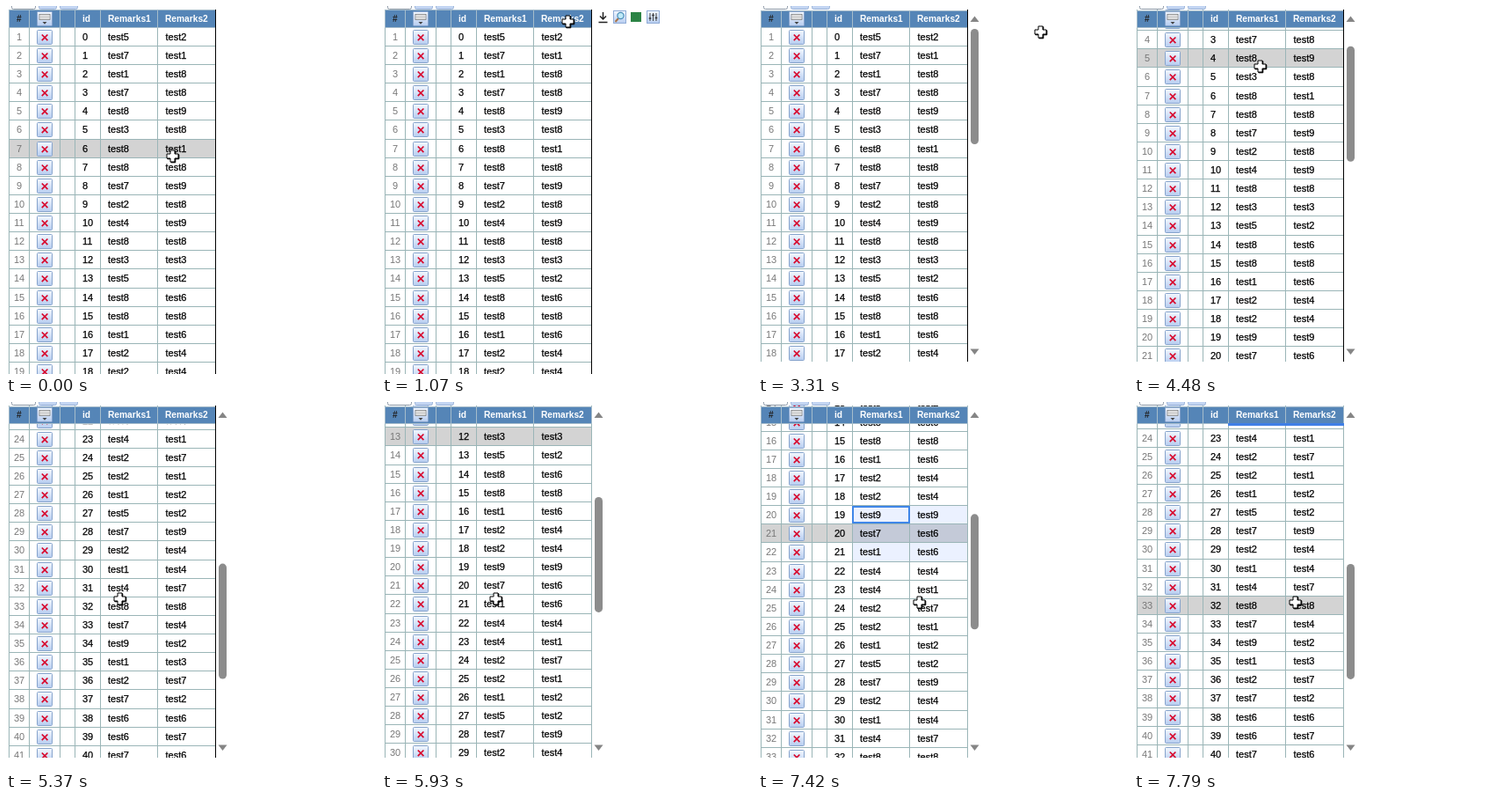
Recreate the animation shown at these times as an HTML page. Size 421 by 418 pixels, loop 8000 ms.

```html
<!DOCTYPE html>
<html lang="en">
<head>
<meta charset="utf-8">
<title>Scrolling table</title>
<style>
  html, body { margin: 0; width: 100%; height: 100%; overflow: hidden; background: #fff; }
  svg { display: block; }
  text { font: 11px "Liberation Sans", Arial, sans-serif; white-space: pre; }
  #rows text { stroke: #000; stroke-width: .25px; }
  #rows text.num { fill: #777; stroke: none; }
  #head text { font-size: 10.2px; font-weight: bold; fill: #fff; }
</style>
</head>
<body>
<svg width="421" height="418" viewBox="0 0 421 418">
  <defs>
    <linearGradient id="btn" x2="0" y2="1">
      <stop offset="0" stop-color="#f3f8ff"/>
      <stop offset="1" stop-color="#b7cdf0"/>
    </linearGradient>
    <clipPath id="view"><rect id="viewRect" x="3" y="4" width="236"/></clipPath>
    <rect id="key" width="17" height="16" rx="1" fill="url(#btn)" stroke="#86a3cc"/>
    <g id="remove">
      <use href="#key" x="35.5" y="2.5"/>
      <path d="M40.8 7.5l6.6 6.6m0-6.6l-6.6 6.6" stroke="#d8062c" stroke-width="1.7"/>
    </g>
    <path id="plus" d="M-2.5-6.5h5v4h4v5h-4v4h-5v-4h-4v-5h4z"/>
  </defs>

  <g stroke="#9db4d8" fill="#c3d5f2">
    <rect x="6.5" y="-8.5" width="27" height="12" rx="2" fill="#fff" stroke="#8e9aa8"/>
    <rect x="37.5" y="-8.5" width="20" height="12" rx="2"/>
    <rect x="61.5" y="-8.5" width="20" height="12" rx="2"/>
  </g>

  <g clip-path="url(#view)">
    <g id="body">
      <rect id="hover" x="3" width="236" height="21" fill="#d3d3d3"/>
      <rect id="tint" x="107" fill="#3c78ff" fill-opacity=".1"/>
      <g id="rows"></g>
      <rect id="active" x="108" width="64" height="18" fill="none" stroke="#3f86e8" stroke-width="2"/>
    </g>
  </g>

  <g id="head">
    <rect id="headBack" x="3.5" width="235" fill="#5585b7" stroke="#a5bccb"/>
    <use href="#key" x="35.5" y="6.5"/>
    <rect x="38" y="9.5" width="12" height="6" fill="#f6f6f6" stroke="#777" stroke-width=".8"/>
    <path d="M39.5 11.5h9M39.5 13.5h9" stroke="#777" stroke-dasharray="1 1"/>
    <path d="M41.5 18h5l-2.5 2.8z" fill="#444"/>
  </g>
  <rect id="edge" x="107" y="24" width="132" height="3" fill="#3f7fe6"/>
  <rect id="caret" x="238" y="4" width="1"/>

  <g id="tools">
    <path d="M251.5 7v8m-3.5-3.5l3.5 3.5l3.5-3.5M246.5 18.5h10" fill="none" stroke="#222" stroke-width="1.5"/>
    <rect x="263.5" y="5.5" width="14" height="14" fill="url(#btn)" stroke="#8fabd6"/>
    <path d="M269 14l-3.5 4" stroke="#a8744a" stroke-width="2"/>
    <circle cx="271.5" cy="11" r="3.6" fill="#bfeaf7" stroke="#4a8db8" stroke-width="1.2"/>
    <rect x="283" y="7" width="12" height="11" fill="#2b8344"/>
    <rect x="301.5" y="5.5" width="14" height="14" fill="url(#btn)" stroke="#8fabd6"/>
    <path d="M305 8v9m3.5-9v9m3.5-9v9" stroke="#444"/>
    <path d="M303.7 14h2.6m.9-3.5h2.6m.9 3h2.6" stroke="#333" stroke-width="1.5"/>
  </g>

  <g id="bar" fill="#858585">
    <path d="M241.5 18h10l-5-6.5z"/>
    <path d="M241.5 389.5h10l-5 6.5z"/>
    <rect id="thumb" x="242" width="9" height="131" rx="4.5" fill="#8c8c8c"/>
  </g>

  <g id="pointer">
    <circle id="ring" r="9.7" fill="#fff" fill-opacity=".75" stroke="#111" stroke-width="1.3"/>
    <g id="cross" stroke="#000">
      <use href="#plus" x=".8" y=".8"/>
      <use href="#plus" fill="#fff"/>
    </g>
    <path id="hand" fill="#fff" stroke="#000" stroke-width="1.1" stroke-linejoin="round"
      d="M-1.5 11V1Q-1.5-.7 0-.7T1.5 1V7Q3.3 5.7 4.3 7.6Q6 6.6 7 8.4Q9.6 7.6 9.6 10.5V14.5Q9.6 16.5 8 18.5V21H0V19L-4.6 12.8Q-5.4 10.8-3.6 10.4Q-2.5 10.3-1.5 12ZM1.5 7V11M4.4 8V11.4M7 9V12"/>
  </g>
</svg>
<script>
const LOOP = 8000, TOP = 25, ROW = 21.125, BLINK = 508;
const COLS = [3, 26, 61, 78, 107, 172, 238];
const TOOLS_ON = 1070, BAR_ON = 3160, PRESS = 6350, DRAGGED = 6600, RELEASE = 6900;
const FIRST = 19, LAST = 21;

// Last character of each "test" label, one string per column.
const LABELS = [
  "57178388724835881229714422157214879127667",
  "21889818989832686449664171229447842372676"
];

const wheel = (start, time, dy) => ({ start, time, dy });
const WHEEL = [
  wheel(4020, 180, 95), wheel(4300, 170, -35), wheel(4750, 620, 419),
  wheel(5370, 360, 1), wheel(5730, 248, -240), wheel(7360, 400, 240)
];

const move = (start, time, x, y) => ({ start, time, x, y });
const MOVES = [
  move(0, 1, 190, 171), move(620, 450, 212, 18), move(1460, 600, 307, 20),
  move(BAR_ON, 150, 322, 30), move(3520, 480, 144, 69), move(4500, 200, 130, 224),
  move(6020, 200, 140, 196), move(PRESS, DRAGGED - PRESS, 206, 235), move(RELEASE, 380, 184, 228)
];

const $ = id => document.getElementById(id);
const set = (id, attrs) => { for (const k in attrs) $(id).setAttribute(k, attrs[k]); };
const show = (id, on) => set(id, { visibility: on ? "visible" : "hidden" });
const rowTop = i => Math.round(TOP - .25 + ROW * i);
const part = (m, t) => Math.min(1, Math.max(0, (t - m.start) / m.time));
const easeOut = p => 1 - (1 - p) ** 2;
const easeBoth = p => p * p * (3 - 2 * p);

const scrollAt = t => Math.round(WHEEL.reduce((s, w) => s + w.dy * easeOut(part(w, t)), 0));

function cursorAt(t) {
  let { x, y } = MOVES[0];
  for (const m of MOVES) {
    const p = easeBoth(part(m, t));
    x += (m.x - x) * p;
    y += (m.y - y) * p;
  }
  return { x: Math.round(x), y: Math.round(y) };
}

// The hovered row stays the same while the wheel turns.
function rowUnder(t) {
  let w;
  while (w = WHEEL.find(w => t >= w.start && t < w.start + w.time)) t = w.start - 1;
  const { x, y } = cursorAt(t);
  return x > 238 || y < TOP ? -1 : Math.floor((y + scrollAt(t) - TOP) / ROW);
}

function add(parent, tag, attrs, text = "") {
  const el = document.createElementNS("http://www.w3.org/2000/svg", tag);
  for (const k in attrs) el.setAttribute(k, attrs[k]);
  el.textContent = text;
  $(parent).append(el);
}

function build() {
  const count = LABELS[0].length;
  let grid = COLS.map(x => `M${x + .5} ${TOP}V${rowTop(count)}`).join("");
  for (let i = 0; i < count; i++) {
    const top = rowTop(i), y = top + 14;
    grid += `M3 ${rowTop(i + 1) - .5}H239`;
    add("rows", "text", { x: 15, y, class: "num", "text-anchor": "middle" }, i + 1);
    add("rows", "use", { href: "#remove", y: top });
    add("rows", "text", { x: 87, y }, i);
    LABELS.forEach((s, c) => add("rows", "text", { x: c ? 181.5 : 116, y }, "test" + s[i]));
  }
  add("rows", "path", { d: grid, stroke: "#9ab5b7", fill: "none" });
  add("head", "path", { d: COLS.map(x => `M${x + .5} 5V25`).join(""), stroke: "#a5bccb" });
  add("head", "text", { x: 12, y: 18, style: "fill:#222" }, "#");
  add("head", "text", { x: 87, y: 18 }, "id");
  add("head", "text", { x: 116, y: 18 }, "Remarks1");
  add("head", "text", { x: 181, y: 18 }, "Remarks2");
}

function drawSelection(t, scroll, x) {
  const on = t >= PRESS, done = t >= DRAGGED, top = rowTop(FIRST);
  const last = done ? LAST : Math.min(LAST, Math.max(FIRST, rowUnder(t)));
  show("tint", on);
  show("active", on);
  show("edge", on && rowTop(LAST + 1) - scroll < TOP);
  set("tint", { y: top, width: done || x > 172 ? 131 : 65, height: rowTop(last + 1) - top });
  set("active", { y: top + 1 });
}

function draw(t) {
  const scroll = scrollAt(t), { x, y } = cursorAt(t), row = rowUnder(t);
  const fixed = t >= BAR_ON, height = fixed ? 400 : 414;
  set("viewRect", { height });
  set("body", { transform: `translate(0 ${-scroll})` });
  set("headBack", fixed ? { y: 5.5, height: 19 } : { y: 4.5, height: 20 });
  show("hover", row >= 0);
  set("hover", { y: rowTop(row) });
  drawSelection(t, scroll, x);

  show("caret", t < PRESS && Math.floor((t + 38) / BLINK) % 2 === 0);
  set("caret", { height });
  show("tools", t >= TOOLS_ON && !fixed);
  show("bar", fixed);
  set("thumb", { y: 26 + scroll * .329 });

  const hand = x > 244 && !fixed, shift = hand ? 0 : -.5;
  show("hand", hand);
  show("cross", !hand);
  show("ring", t >= PRESS && t < RELEASE);
  set("pointer", { transform: `translate(${x + shift} ${y + shift})` });
}

build();
const start = performance.now();
function tick() {
  draw((performance.now() - start) % LOOP);
  requestAnimationFrame(tick);
}
tick();
</script>
</body>
</html>
```
